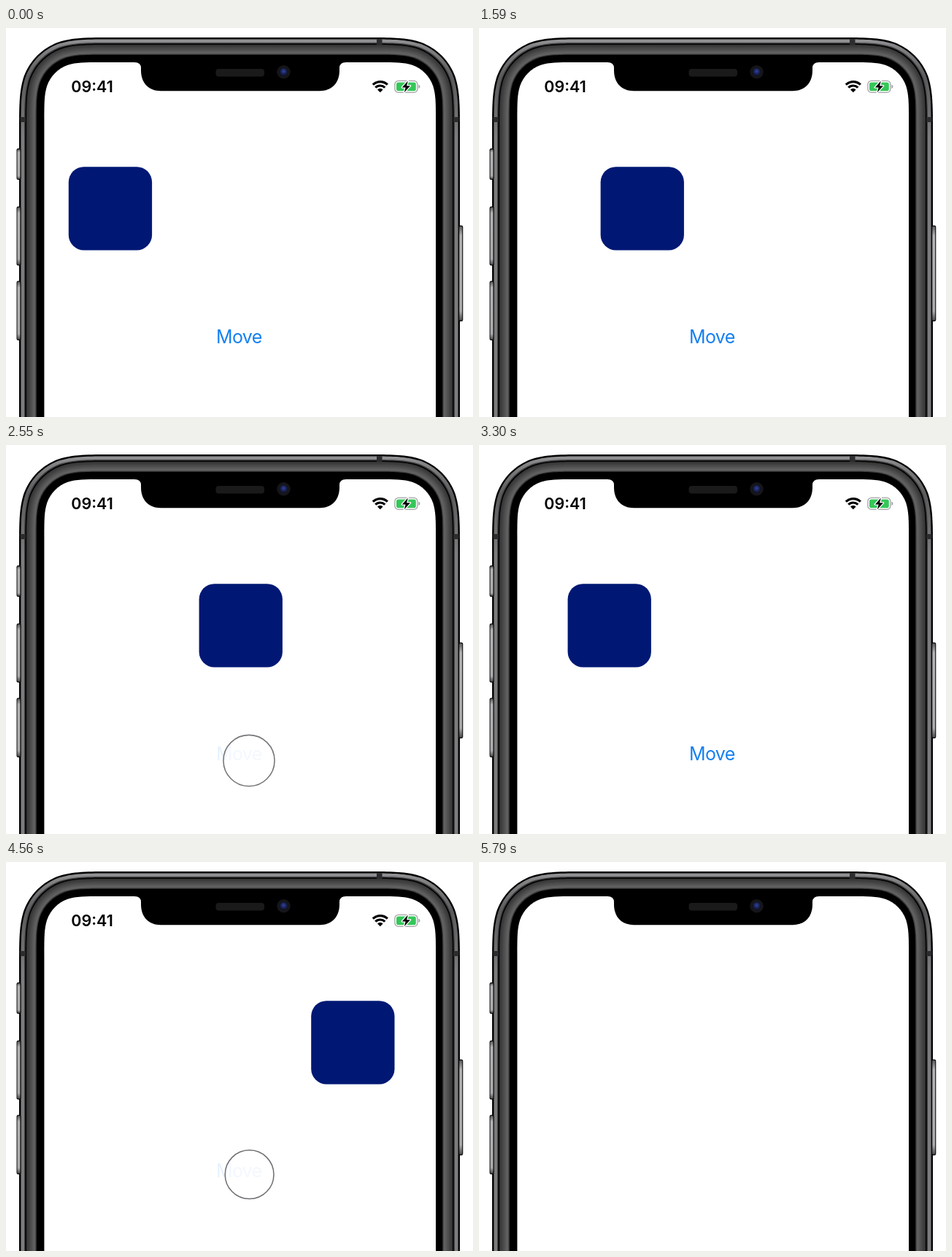
Write an HTML page that moves like this. It is 640 px wide and 533 px high and loops after 5820 ms.

```html
<!DOCTYPE html>
<html lang="en">
<head>
<meta charset="utf-8">
<title>Move</title>
<style>
  html, body { margin: 0; width: 100%; height: 100%; overflow: hidden; background: #fff; }
  svg { display: block; width: 640px; height: 533px; }
  text { font-family: Inter, Roboto, sans-serif; text-anchor: middle; }
</style>
</head>
<body>
<svg viewBox="0 0 640 533">
  <defs>
    <linearGradient id="rim" x1="0" y1="13" x2="0" y2="150" gradientUnits="userSpaceOnUse">
      <stop offset="0" stop-color="#98989b"/>
      <stop offset=".08" stop-color="#858588"/>
      <stop offset=".4" stop-color="#5a5a5c"/>
      <stop offset="1" stop-color="#7c7c7e"/>
    </linearGradient>
    <linearGradient id="key" x1="0" y1="0" x2="0" y2="1">
      <stop offset="0" stop-color="#5a5a5c"/>
      <stop offset=".1" stop-color="#b4b4b6"/>
      <stop offset=".9" stop-color="#acacae"/>
      <stop offset="1" stop-color="#4a4a4c"/>
    </linearGradient>
    <radialGradient id="lens" cx=".5" cy=".4" r=".6">
      <stop offset="0" stop-color="#33459c"/>
      <stop offset=".5" stop-color="#1c2763"/>
      <stop offset="1" stop-color="#0e1230"/>
    </radialGradient>
  </defs>

  <g id="phone"></g>
  <path d="M176 45V47Q185 47 185 55V58C185 76 196 86.2 212 86.2H430C446 86.2 457 76 457 58V55Q457 47 466 47V45Z"/>
  <rect x="287.5" y="56" width="66.5" height="10.5" rx="4" fill="#1a1a1b"/>
  <circle cx="380.5" cy="60.3" r="9.2" fill="#15151a"/>
  <circle cx="380.5" cy="60.3" r="5" fill="url(#lens)"/>

  <g id="content">
    <text x="118" y="88" font-size="21.5" font-weight="600">09:41</text>
    <g fill="none" stroke="#000" stroke-width="3.2">
      <path d="M502.8 77.6A14.6 14.6 0 0 1 522.8 77.6"/>
      <path d="M506.3 81.6A9.4 9.4 0 0 1 519.3 81.6"/>
    </g>
    <path d="M512.8 88.2L509 84.4A5.4 5.4 0 0 1 516.6 84.4Z"/>
    <rect x="532.9" y="72.3" width="31" height="16" rx="4.8" fill="#fff" stroke="#a3a3a5" stroke-width="1.3"/>
    <rect x="535" y="74.4" width="26.8" height="11.8" rx="2.8" fill="#34c759"/>
    <path d="M565.4 77.6Q567.4 78.4 567.4 80.3T565.4 83Z" fill="#a3a3a5"/>
    <path d="M550.8 72.6L542.8 81.4H547.6L545.8 88.2L554 79.2H549.1Z" stroke="#fff" stroke-width="2.6" paint-order="stroke" stroke-linejoin="round"/>
    <rect id="box" y="190.2" width="114.3" height="114.3" rx="21" fill="#001874"/>
    <text id="label" x="319.4" y="432" font-size="25" letter-spacing="-.6" fill="#1480f0">Move</text>
  </g>
  <circle id="ring" fill="#fff" fill-opacity=".5" stroke="#6c6c70"/>
</svg>
<script>
const LOOP = 5820, HOME = 85.8, MOVE = 350, FADE = [5615, 5785];
const $ = id => document.getElementById(id);
const box = $('box'), label = $('label'), ring = $('ring'), content = $('content');

// press, release, start of the move, touch x, touch y, new box x
const taps = [
  [1130, 1230, 1300, 341.3, 409, 171.5],
  [1820, 1895, 2000, 327.3, 425.7, 264.6],
  [2425, 2535, 2640, 333, 432.4, 330],
  [2760, 2850, 2950, 331, 427, 121.6],
  [3330, 3420, 3500, 331, 428, 165],
  [3890, 3990, 4100, 333, 428, 418.2],
  [4450, 4558, 4650, 333.6, 428.2, 418.2],
  [4975, 5070, 5145, 333, 435, HOME]
];

const clamp = v => Math.max(0, Math.min(1, v));
const ramp = (t, start, length) => clamp((t - start) / length);
const ease = v => v < .5 ? 2 * v * v : 1 - 2 * (1 - v) * (1 - v);
const set = (el, attrs) => { for (const k in attrs) el.setAttribute(k, attrs[k]); };

function add(tag, attrs) {
  const el = document.createElementNS('http://www.w3.org/2000/svg', tag);
  set(el, attrs);
  $('phone').append(el);
}

const rect = (x, y, width, height, rx, fill) => add('rect', { x, y, width, height, rx, fill });

// Body outline with continuous-curvature top corners, open below the stage.
function shell(inset, fill, left = 18 + inset, right = 622 - inset) {
  const top = 13 + inset, r = 85 - inset;
  const l = (u, v) => `${left + u * r} ${top + v * r} `;
  const m = (u, v) => `${right - u * r} ${top + v * r} `;
  const d = `M${left} 600L` + l(0, 1.528) +
    'C' + l(0, 1.088) + l(0, .868) + l(.075, .631) + l(.169, .372) + l(.372, .169) + l(.631, .075) +
    l(.868, 0) + l(1.088, 0) + l(1.528, 0) + 'L' + m(1.528, 0) +
    'C' + m(1.088, 0) + m(.868, 0) + m(.631, .075) + m(.372, .169) + m(.169, .372) + m(.075, .631) +
    m(0, .868) + m(0, 1.088) + m(0, 1.528) + `L${right} 600Z`;
  add('path', { d, fill });
}

function buildPhone() {
  shell(0, '#000');
  shell(2.4, 'url(#rim)');
  shell(7, '#3e3e40');
  shell(8.4, '#000');
  for (let i = 0; i < 7; i++) {
    const g = 54 + i * 7;
    shell(10 + i * 1.6, `rgb(${g},${g},${g})`);
  }
  shell(22.4, '#3a3a3a');
  shell(23.8, '#000');
  shell(34, '#fff', 52.4, 589);
  rect(508, 15, 7.5, 8, 0, '#2c2c2e');
  rect(19.5, 122, 7.5, 7, 0, '#2c2c2e');
  rect(613, 122, 7.5, 7, 0, '#2c2c2e');
  for (const [x, y, h] of [[14.5, 165, 43], [14.5, 244.5, 81], [14.5, 346.5, 81.5], [620.3, 270.5, 131.5]]) {
    rect(x, y, 6, h, 2.2, '#0a0a0a');
    rect(x + 1, y + 1.2, 3.9, h - 2.4, 1.4, 'url(#key)');
  }
}

function draw(t) {
  let x = HOME, ink = 1, touch = null;
  for (const [press, release, start, cx, cy, to] of taps) {
    if (t < press) break;
    x += (to - x) * ease(ramp(t, start, MOVE));
    const down = 1 - .9 * ramp(t, press, 80);
    ink = down + (1 - down) * ease(ramp(t, release + 35, 240));
    const grow = ramp(t, release, 210);
    touch = {
      cx, cy,
      r: 33 + 27 * grow,
      opacity: ramp(t, press, 60) * (1 - grow),
      'stroke-width': 1.5 + grow
    };
  }
  box.setAttribute('x', x.toFixed(2));
  label.setAttribute('opacity', ink.toFixed(3));
  set(ring, touch || { opacity: 0 });
  content.setAttribute('opacity', 1 - ramp(t, FADE[0], FADE[1] - FADE[0]));
}

buildPhone();
const begin = performance.now();
function tick() {
  draw((performance.now() - begin) % LOOP);
  requestAnimationFrame(tick);
}
tick();
</script>
</body>
</html>
```
